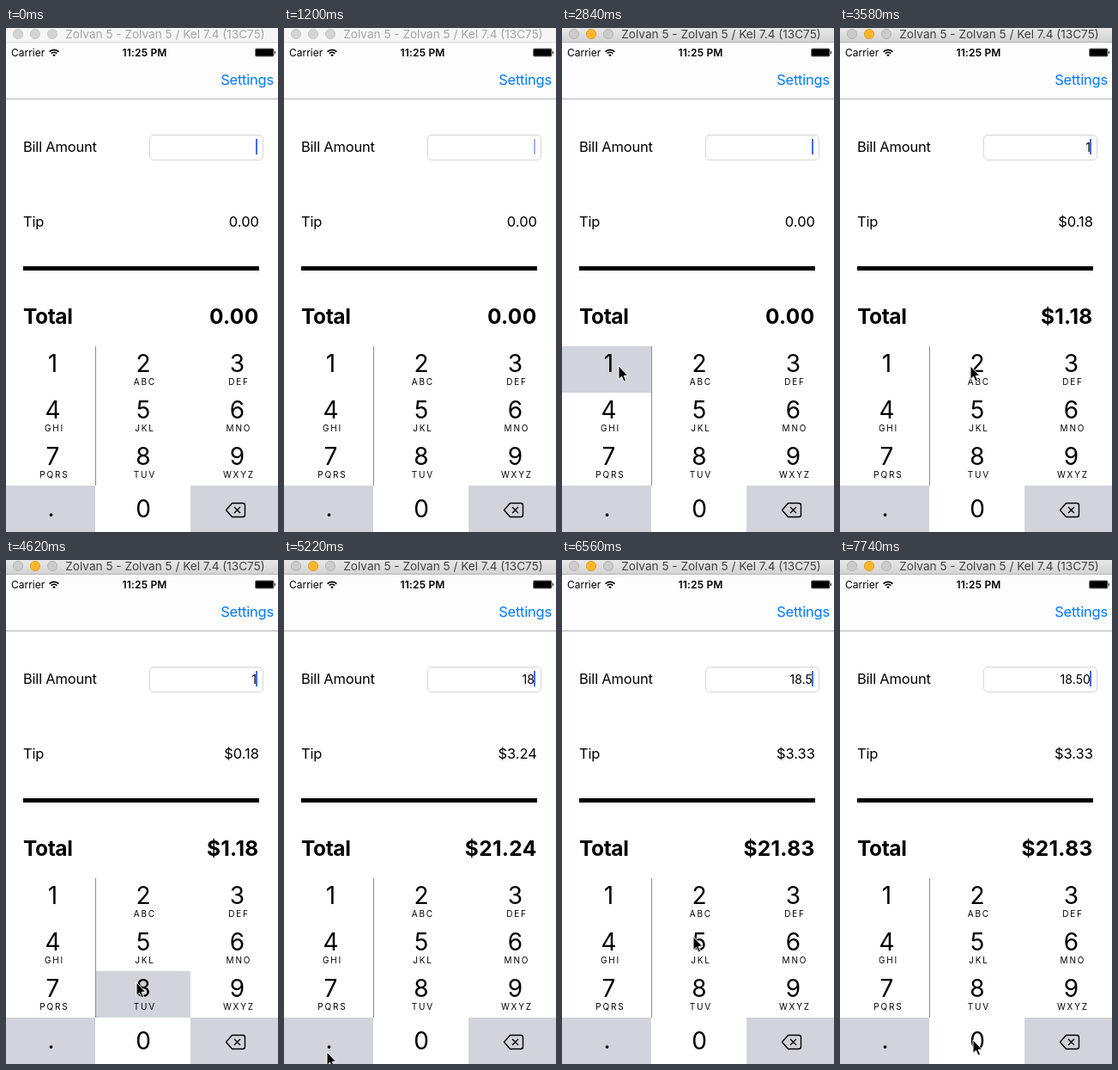
An HTML page that plays this animation: 317x586 px, repeating every 8 s.

```html
<!DOCTYPE html>
<html lang="en">
<head>
<meta charset="utf-8">
<title>Tip calculator</title>
<style>
  html, body { margin: 0; width: 100%; height: 100%; overflow: hidden; background: #fff; }
  svg { display: block; width: 317px; height: 586px; font-optical-sizing: none; }
  text { font-family: Inter, Roboto, sans-serif; }
  .label { font-size: 16.5px; letter-spacing: -.22px; }
  .value { font-size: 16.5px; }
  .total { font-size: 24.5px; font-weight: 700; }
  .status { font-size: 12px; }
  .digit { font-size: 28px; text-anchor: middle; }
  .letters { font-size: 10px; letter-spacing: 1.8px; text-anchor: middle; }
  .end { text-anchor: end; }
  .mid { text-anchor: middle; }
  #title { font-size: 13.6px; }
  #bill { font-size: 14px; letter-spacing: .1px; }
</style>
</head>
<body>
<svg viewBox="0 0 317 586">
  <defs>
    <linearGradient id="active" x2="0" y2="1">
      <stop stop-color="#e8e8e8"/><stop offset="1" stop-color="#d2d2d2"/>
    </linearGradient>
  </defs>
  <rect width="317" height="586" fill="#fff"/>

  <!-- window bar -->
  <rect id="bar" width="317" height="17"/>
  <rect id="barEdge" y="16" width="317" height="1"/>
  <g id="buttons">
    <circle cx="14" cy="7" r="5.6"/><circle cx="34" cy="7" r="5.6"/><circle cx="54" cy="7" r="5.6"/>
  </g>
  <text id="title" class="mid" x="185.5" y="12">Zolvan 5 - Zolvan 5 / Kel 7.4 (13C75)</text>

  <!-- status and navigation -->
  <rect y="17" width="317" height="65" fill="#fdfdfd"/>
  <text class="status" x="6" y="32.5">Carrier</text>
  <path d="M50.6 27.6a7.6 7.6 0 0 1 10.8 0M52.7 29.7a4.7 4.7 0 0 1 6.6 0" fill="none" stroke="#000" stroke-width="1.7"/>
  <path d="M56 33.2l-1.8-1.9a2.6 2.6 0 0 1 3.6 0z"/>
  <text class="status mid" x="161.5" y="32.5" font-weight="600" letter-spacing=".2">11:25 PM</text>
  <rect x="290" y="23.500" width="22.500" height="10" rx="2" fill="#777"/>
  <rect x="291" y="24.500" width="20.500" height="8" rx="1"/>
  <path d="M313 26.5q2 2 0 4z"/>
  <text class="label end" x="312" y="66" fill="#007aff">Settings</text>
  <rect y="82" width="317" height="1" fill="#b2b2b2"/>

  <!-- form -->
  <text class="label" x="20" y="144">Bill Amount</text>
  <rect x="167.5" y="124.5" width="132" height="29" rx="4.5" fill="#fff" stroke="#d6d6d6"/>
  <text id="bill" class="end" x="292" y="143.5"></text>
  <rect id="caret" x="291" y="129" width="2" height="18" fill="#426bdc"/>
  <text class="label" x="20" y="231">Tip</text>
  <text id="tip" class="value end" x="295" y="231"></text>
  <rect x="20" y="277" width="275" height="5"/>
  <text class="total" x="20" y="344" letter-spacing="-.4">Total</text>
  <text id="total" class="total end" x="294.5" y="344" letter-spacing=".3"></text>

  <g id="keypad"></g>
  <rect x="104" y="370" width="1" height="162" fill="#8c8c8c"/>
  <path d="M263.5 552.5H276q2.5 0 2.5 2.5v11q0 2.5-2.5 2.5h-12.5l-7-8zM266 557l7 7m0-7l-7 7"
    fill="none" stroke="#000" stroke-width="1.4" stroke-linejoin="round"/>

  <path id="pointer" d="M0 0V15.5L3.5 12.3 6 18 8.6 17 6.2 11.3H10.8Z" stroke="#fff" stroke-linejoin="round"/>
</svg>
<script>
const LOOP = 8000, TICK = 149, GREY = '#d1d5db', WHITE = '#fff';
const $ = id => document.getElementById(id);

const keys = ['1', '2 ABC', '3 DEF', '4 GHI', '5 JKL', '6 MNO', '7 PQRS', '8 TUV', '9 WXYZ', '.', '0', ''];
// Left edge, width and text centre of each column.
const columns = [[0, 104, 54.5], [104, 111, 160], [215, 102, 269.5]];
$('keypad').innerHTML = keys.map((key, i) => {
  const [digit, letters = ''] = key.split(' ');
  const [x, width, center] = columns[i % 3];
  const top = 370 + 54 * Math.floor(i / 3);
  const baseline = digit === '.' ? 567.5 : digit === '0' ? 569 : top + 30;
  return `<rect id="key${digit}" x="${x}" y="${top}" width="${width}" height="54" fill="${digit ? WHITE : GREY}"/>
    <text class="digit" x="${digit === '.' ? 52.5 : center}" y="${baseline}">${digit}</text>
    <text class="letters" x="${center + 1.9}" y="${top + 45}">${letters}</text>`;
}).join('');

// All times below are in ticks.
const presses = [
  { key: '1', down: 19, up: 21 },
  { key: '8', down: 31, up: 32 },
  { key: '.', down: 36, up: 37 },
  { key: '5', down: 43, up: 44 },
  { key: '0', down: 51, up: 52 }
];
// Each blink: the half-faded tick, then the tick at which the caret returns.
const blinks = [[2, 5], [8, 11], [15, 18], [26, 29], [42, 44], [49, 52]];
const path = [
  [11, 120, 550], [13, 66, 408], [14, 66, 408], [15, 66, 393], [21, 66, 393], [24, 152, 393],
  [28, 152, 491], [32, 152, 491], [35, 50, 572], [37, 50, 572], [40, 147, 443],
  [42, 153, 438], [45, 153, 438], [49, 155, 558], [54, 155, 558]
];

function pointerAt(tick) {
  const next = path.findIndex(p => p[0] > tick);
  const [t0, x0, y0] = path[next - 1], [t1, x1, y1] = path[next];
  const k = (tick - t0) / (t1 - t0);
  return [x0 + (x1 - x0) * k, y0 + (y1 - y0) * k];
}

function draw(time) {
  const tick = Math.floor((time % LOOP + 12) / TICK);

  const active = tick >= 19;
  $('bar').setAttribute('fill', active ? 'url(#active)' : '#f6f6f6');
  $('barEdge').setAttribute('fill', active ? '#b4b4b4' : '#dadada');
  $('title').setAttribute('fill', active ? '#404040' : '#a5a5a5');
  [...$('buttons').children].forEach((button, i) => {
    const yellow = active && i === 1;
    button.setAttribute('fill', yellow ? '#fdb52c' : active ? '#cbcbcb' : '#d3d3d3');
    button.setAttribute('stroke', yellow ? '#dfa023' : active ? '#b5b5b5' : '#cacaca');
  });

  const bill = presses.filter(p => tick >= p.up).map(p => p.key).join('');
  const amount = Number(bill), money = n => (bill ? '$' : '') + n.toFixed(2);
  $('bill').textContent = bill;
  $('tip').textContent = money(amount * .18);
  $('total').textContent = money(amount * 1.18);

  for (const { key, down, up } of presses) {
    const held = tick >= down && tick < up;
    $('key' + key).setAttribute('fill', held === (key === '.') ? WHITE : GREY);
  }

  const blink = blinks.find(([fade, on]) => tick >= fade && tick < on);
  $('caret').setAttribute('opacity', !blink ? 1 : tick === blink[0] ? .5 : 0);

  const shown = tick >= path[0][0];
  $('pointer').setAttribute('visibility', shown ? 'visible' : 'hidden');
  if (shown) $('pointer').setAttribute('transform', `translate(${pointerAt(tick)})`);
}

const start = performance.now();
function frame() {
  draw(performance.now() - start);
  requestAnimationFrame(frame);
}
frame();
</script>
</body>
</html>
```
